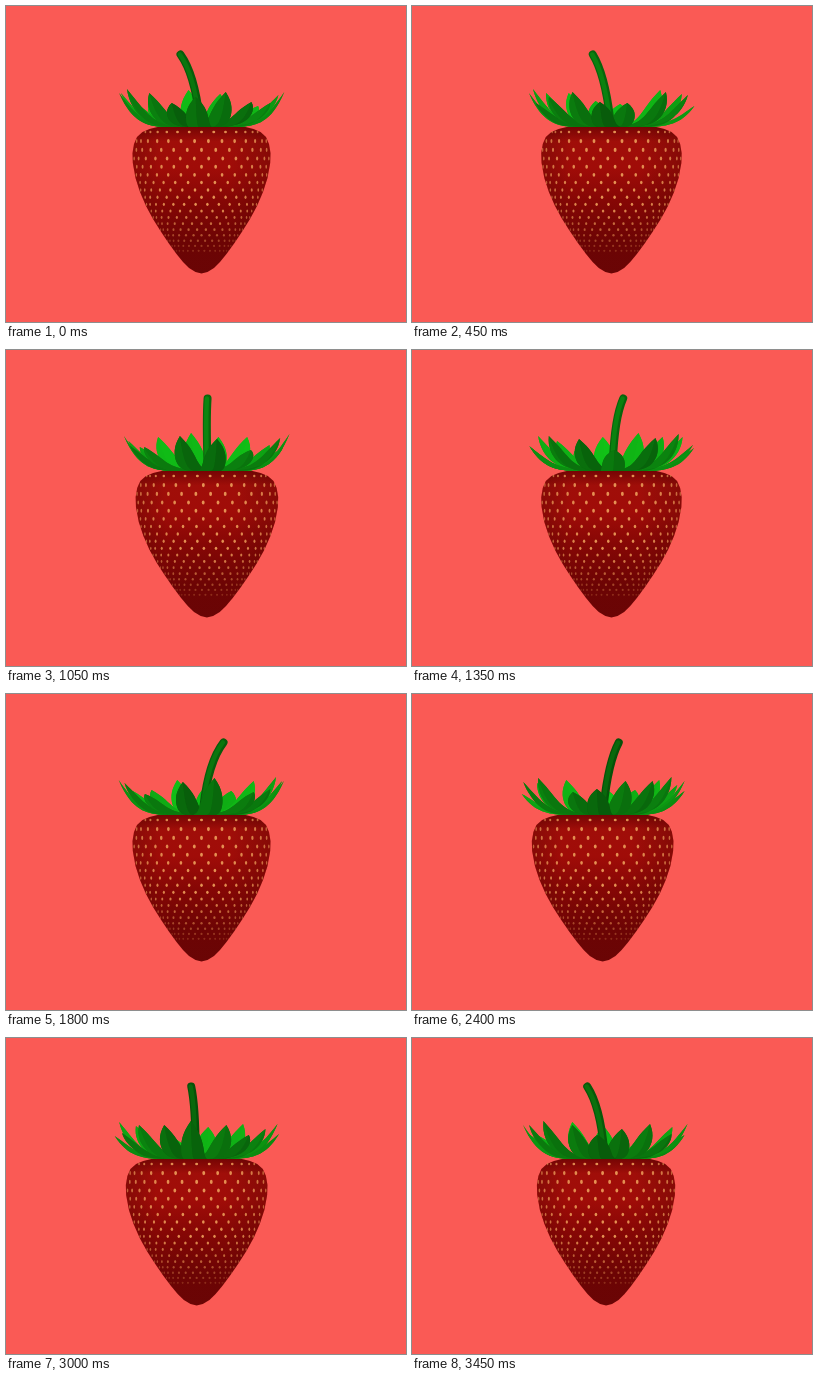
Animation of 400x316 px, one loop 3600 ms. Source, as an HTML page with a canvas:

```html
<!DOCTYPE html>
<html>
<head>
<meta charset="utf-8">
<title>Turning strawberry</title>
<style>
html, body { margin: 0; width: 100%; height: 100%; overflow: hidden; background: #fa5a55; }
canvas { display: block; }
</style>
</head>
<body>
<canvas id="stage" width="400" height="316"></canvas>
<script>
const ctx = document.getElementById('stage').getContext('2d');
const LOOP = 3600, STEP = 150, AXIS = 195, TAU = Math.PI * 2;

// Half width of the fruit at a few heights.
const profile = [[121, 44], [123, 52], [126, 59], [131, 64.5], [138, 67.5], [147, 69],
  [157, 68.7], [172, 66], [186, 61.5], [200, 55.5], [213, 48.5], [225, 41], [237, 33],
  [248, 25], [256, 18.5], [262, 12.5], [266, 6], [267.5, 0]];

// Leaves: direction in degrees, height of the tip.
const leaves = [[-4, 91], [17, 86], [37, 96], [56, 97], [86, 86], [112, 89], [137, 100],
  [167, 88], [189, 84], [219, 98], [236, 95], [256, 87], [277, 87], [296, 83],
  [321, 87], [339, 97]];

function halfWidth(y) {
  let i = 1;
  while (i < profile.length - 1 && profile[i][0] < y) i++;
  const [y0, w0] = profile[i - 1], [y1, w1] = profile[i];
  return w0 + (w1 - w0) * (y - y0) / (y1 - y0);
}

function fillShape(points, color) {
  ctx.beginPath();
  points.forEach(([x, y]) => ctx.lineTo(x, y));
  ctx.closePath();
  ctx.fillStyle = color;
  ctx.fill();
}

function gradient(x0, y0, x1, y1, stops) {
  const g = ctx.createLinearGradient(x0, y0, x1, y1);
  stops.forEach(([at, color]) => g.addColorStop(at, color));
  return g;
}

function green(level) {
  return `rgb(${level * 0.09 | 0},${level | 0},${level * 0.12 | 0})`;
}

// Each leaf lies flat near the stem and curls up steeply at its tip.
function drawLeaf(cx, angle, tipY, index) {
  const s = Math.sin(angle), c = Math.cos(angle);
  const left = [], mid = [], right = [];
  for (let i = 0; i <= 24; i++) {
    const u = i / 24, rise = u ** 4.2;
    const r = 20 + 63 * u, y = 121 - (121 - tipY) * rise;
    const w = 11.5 * Math.cos(Math.PI / 2 * rise ** 1.15);
    const edgeY = y - w * 0.5 * u;
    left.push([cx + r * s - w * c, edgeY]);
    mid.push([cx + r * s, y]);
    right.push([cx + r * s + w * c, edgeY]);
  }
  const level = 150 - 42 * c + 9 * Math.sin(index * 2.4);
  fillShape(left.concat([...right].reverse()), green(level));
  fillShape(left.concat([...mid].reverse()), green(level + 5 * c));
  fillShape(right.concat([...mid].reverse()), green(level - 7));
}

function drawStem(cx, turn) {
  const lean = Math.cos(turn), away = Math.sin(turn);
  const stroke = (color, width, shift) => {
    ctx.beginPath();
    ctx.moveTo(AXIS + 1 - 21.5 * lean + shift, 48.5);
    ctx.quadraticCurveTo(AXIS + 0.5 - 7 * lean + 3 * away + shift, 68, cx - 2 * lean + shift, 112);
    ctx.strokeStyle = color;
    ctx.lineWidth = width;
    ctx.stroke();
  };
  ctx.lineCap = 'round';
  stroke(green(92 + 12 * away), 8, 0);
  stroke(green(118 + 16 * away), 4.5, -0.6);
}

function drawFruit(cx, scale) {
  const side = sign => profile.map(([y, w]) => [cx + sign * w * scale, y]);
  const edge = [...side(1), ...side(-1).reverse()];
  fillShape(edge, gradient(0, 121, 0, 268, [[0, '#760504'], [0.1, '#a00e09'], [0.28, '#a00c08'],
    [0.5, '#860705'], [0.78, '#6c0404'], [1, '#6a0505']]));
  const dark = 'rgba(50,0,0,.25)', clear = 'rgba(50,0,0,0)';
  fillShape(edge, gradient(cx - 72, 0, cx + 72, 0,
    [[0, dark], [0.22, clear], [0.7, clear], [1, dark]]));
}

function drawSeeds(cx, scale, turn) {
  const perRow = 30;
  for (let row = 0; row < 18; row++) {
    const y = 126 + 9.2 * row - 0.13 * row * row;
    const r = halfWidth(y) * scale;
    const height = row ? 2.2 - row * 0.065 : 1.3;
    const fade = row < 9 ? 0.95 : 0.95 - (row - 9) * 0.085;
    for (let i = 0; i < perRow; i++) {
      const a = (i + row % 2 / 2) / perRow * TAU - turn;
      const facing = Math.cos(a);
      if (facing < 0.12) continue;
      ctx.globalAlpha = fade * (0.55 + 0.45 * facing);
      ctx.fillStyle = '#e99957';
      ctx.beginPath();
      ctx.ellipse(cx + r * Math.sin(a), y, (1.5 - row * 0.025) * (0.4 + 0.6 * facing),
        height, 0, 0, TAU);
      ctx.fill();
    }
  }
  ctx.globalAlpha = 1;
}

function draw(time) {
  const turn = Math.floor(time % LOOP / STEP) * STEP / LOOP * TAU;
  const cx = AXIS + 0.5 + 5.6 * Math.sin(turn);
  const scale = 1 + 0.035 * Math.sin(turn) ** 2;
  ctx.fillStyle = '#fa5a55';
  ctx.fillRect(0, 0, 400, 316);

  const sorted = leaves
    .map(([deg, tipY], index) => ({ angle: deg * Math.PI / 180 - turn, tipY, index }))
    .sort((a, b) => Math.cos(a.angle) - Math.cos(b.angle));
  const drawSide = front => sorted
    .filter(leaf => Math.cos(leaf.angle) >= 0 === front)
    .forEach(leaf => drawLeaf(cx, leaf.angle, leaf.tipY, leaf.index));

  drawSide(false);
  drawStem(cx, turn);
  drawFruit(cx, scale);
  drawSeeds(cx, scale, turn);
  drawSide(true);
}

function tick() {
  draw(performance.now());
  requestAnimationFrame(tick);
}
tick();
</script>
</body>
</html>
```
